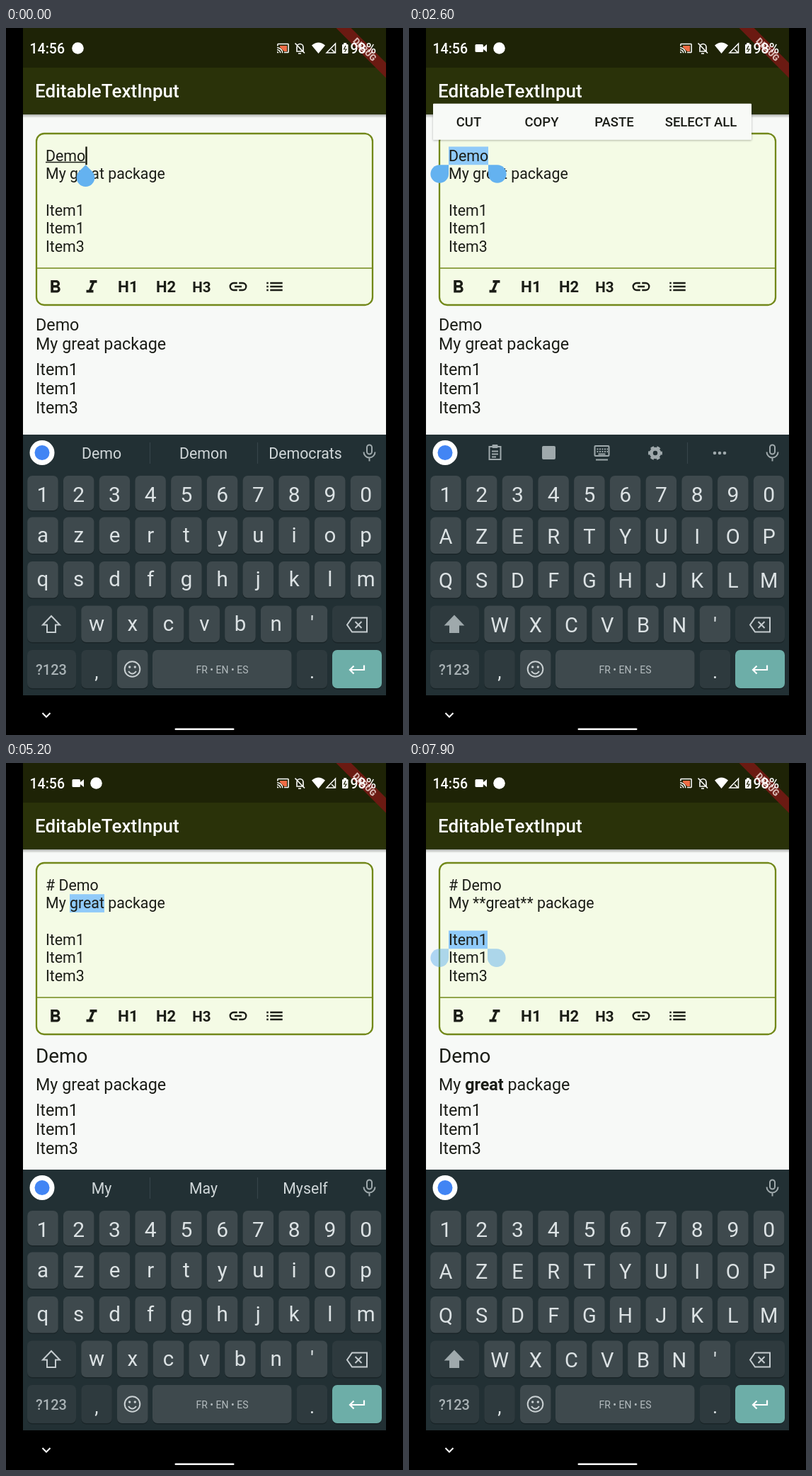
An HTML page for the animation above (8000 ms loop, 561 by 998 pixels).

```html
<!DOCTYPE html>
<html lang="en">
<head>
<meta charset="utf-8">
<title>Text editor demo</title>
<style>
  html, body { margin: 0; width: 100%; height: 100%; overflow: hidden; background: #000; }
  svg { display: block; width: 561px; height: 998px; font-family: Roboto, sans-serif; }
  text { white-space: pre; }
</style>
</head>
<body>
<svg id="stage" viewBox="0 0 561 998">
  <defs>
    <filter id="soft" x="-10%" y="-30%" width="120%" height="160%">
      <feDropShadow dx="0" dy="1" stdDeviation="1.6" flood-opacity=".3"/>
    </filter>
    <linearGradient id="barShade" x2="0" y2="1">
      <stop stop-opacity=".3"/><stop offset="1" stop-opacity="0"/>
    </linearGradient>
    <clipPath id="screen"><path d="M24 0h513v998H24z"/></clipPath>
  </defs>
  <path d="M0 0h561v998H0z"/>
  <path d="M24 122h513v452H24z" fill="#f7f9f7"/>
  <g id="page"></g>
  <path d="M24 122h513v5H24z" fill="url(#barShade)"/>
  <path d="M24 0h513v56H24z" fill="#1e2306"/>
  <path d="M24 56h513v66H24z" fill="#2a3209"/>
  <text x="41" y="97.7" font-size="26" font-weight="500" fill="#fff">EditableTextInput</text>
  <g id="popup"></g>
  <g clip-path="url(#screen)">
    <g transform="translate(537 0) rotate(45)">
      <path d="M-60 34.9H60v15H-60z" fill="#6b1a12"/>
      <text y="47" font-size="12.7" font-weight="900" fill="#d9b9b4" text-anchor="middle">DEBUG</text>
    </g>
  </g>
  <g id="status"></g>
  <path d="M24 574h513v368H24z" fill="#223034"/>
  <g id="keys"></g>
  <g id="strip"></g>
  <path d="M51.500 967l5.500 5.500 5.500-5.500" fill="none" stroke="#fff" stroke-width="2"/>
  <rect x="238.500" y="988.500" width="84" height="2.600" rx="1.300" fill="#fff"/>
</svg>
<script>
const LOOP = 8000, LINE = 25.7, EDIT = 21.35, LEFT = 56;
const INK = '#1b1d17', KEY_INK = '#dce2e4', DIM = '#9fa9ac', BLUE = '#64b2f0';
const $ = id => document.getElementById(id);

const ICONS = {
  bold: 'M15.6 10.79c.97-.67 1.65-1.77 1.65-2.79 0-2.26-1.75-4-4-4H7v14h7.04c2.09 0 3.71-1.7 3.71-3.79 0-1.52-.86-2.82-2.15-3.42zM10 6.500h3c.83 0 1.500.67 1.500 1.500s-.67 1.500-1.500 1.500h-3zm3.500 9H10v-3h3.500c.83 0 1.500.67 1.500 1.500s-.67 1.500-1.500 1.500z',
  italic: 'M10 4v3h2.21l-3.42 8H6v3h8v-3h-2.21l3.42-8H18V4z',
  link: 'M3.9 12c0-1.71 1.39-3.1 3.1-3.1h4V7H7a5 5 0 0 0 0 10h4v-1.9H7c-1.71 0-3.1-1.39-3.1-3.1zM8 13h8v-2H8zm9-6h-4v1.9h4a3.1 3.1 0 0 1 0 6.2h-4V17h4a5 5 0 0 0 0-10z',
  list: 'M3 13h2v-2H3zm0 4h2v-2H3zm0-8h2V7H3zm4 4h14v-2H7zm0 4h14v-2H7zM7 7v2h14V7z',
  cast: 'M1 18v3h3c0-1.66-1.34-3-3-3zm0-4v2c2.76 0 5 2.24 5 5h2c0-3.87-3.13-7-7-7zm0-4v2a9 9 0 0 1 9 9h2c0-6.08-4.93-11-11-11zm20-7H3c-1.1 0-2 .9-2 2v3h2V5h18v14h-7v2h7c1.1 0 2-.9 2-2V5c0-1.1-.9-2-2-2z'
};

const text = (s, x, y, size, fill = INK, extra = '') =>
  `<text x="${x}" y="${y}" font-size="${size}" fill="${fill}" ${extra}>${s}</text>`;
const mid = (s, x, y, size, fill, weight = 400) =>
  text(s, x, y, size, fill, `text-anchor="middle" font-weight="${weight}"`);
const rect = (x, y, w, h, fill, r = 0, extra = '') =>
  `<rect x="${x}" y="${y}" width="${w}" height="${h}" rx="${r}" fill="${fill}" ${extra}/>`;
const line = (d, color, width = 2, fill = 'none') =>
  `<path d="${d}" fill="${fill}" stroke="${color}" stroke-width="${width}"/>`;
const icon = (name, x, y, scale = 1.247, fill = INK) =>
  `<path d="${ICONS[name]}" fill="${fill}" transform="translate(${x} ${y}) scale(${scale}) translate(-12 -12)"/>`;
const grip = (x, y, turn, opacity) =>
  `<path d="M0 0h12.8a12.8 12.8 0 1 1-12.8 12.8z" fill="${BLUE}" opacity="${opacity}" transform="translate(${x} ${y}) ${turn}"/>`;

// Each step overrides part of the state from its time on.
const START = { md: 0, bold: 0, under: 1, cam: 0, caps: 0, words: 'Demo Demon Democrats',
  tools: 0, caret: [113.5, 0], on: 1, drop: 1, sel: null, grips: 0, pop: null, fade: 1 };
const FULL = ['CUT', 'COPY', 'PASTE', 'SELECT ALL'], SHORT = ['PASTE', 'SELECT ALL'];
const STEPS = [
  [0, {}],
  [100, { cam: .25 }],
  [200, { cam: .5, caps: 1, words: '' }],
  [300, { cam: .75 }],
  [400, { cam: 1 }],
  [600, { on: 0 }],
  [1000, { on: 1 }],
  [1500, { on: 0 }],
  [1600, { under: 0, drop: 0, sel: [56, 112, 0] }],
  [1700, { grips: .5, pop: { x: 34, line: 0, items: FULL }, fade: .5 }],
  [1800, { grips: 1, fade: 1 }],
  [2400, { tools: 1 }],
  [2700, { md: 1, caps: 0, tools: 0, sel: null, grips: 0, pop: null, caret: [131, 0], on: 1, drop: 1 }],
  [2900, { words: 'Demo Demon Democrats', pop: { x: 34, line: 0, items: SHORT } }],
  [3500, { on: 0 }],
  [4000, { pop: null, caret: [75.500, 1], on: 1, drop: .85 }],
  [4100, { drop: 1, words: 'My May Myself' }],
  [4600, { on: 0 }],
  [5200, { drop: 0, sel: [90, 139, 1] }],
  [5300, { grips: .5, pop: { x: 34, line: 1, items: FULL }, fade: .5 }],
  [5400, { grips: 1, fade: 1 }],
  [5500, { words: '' }],
  [5900, { tools: 1 }],
  [6100, { bold: 1, sel: null, grips: 0, pop: null, tools: 0, caret: [177, 1], on: 1, drop: 1 }],
  [6400, { words: 'I a you', pop: { x: 54, line: 1, items: SHORT } }],
  [6800, { on: 0 }],
  [7300, { on: 1 }],
  [7800, { on: 0, drop: 0, pop: null, words: '', sel: [56, 111, 3] }],
  [7900, { caps: 1, grips: .5 }]
];
let last = START;
const STATES = STEPS.map(([, change]) => last = { ...last, ...change });

function drawPage(s) {
  const top = n => 167.500 + n * LINE;
  const rows = [s.md ? '# Demo' : 'Demo', s.bold ? 'My **great** package' : 'My great package',
    '', 'Item1', 'Item1', 'Item3'];
  let out = rect(43, 149, 475, 242, '#f4fbe5', 11, 'stroke="#72881a" stroke-width="2.300"') +
    line('M43 339H518', '#72881a', 1.300);
  if (s.sel) out += rect(s.sel[0], top(s.sel[2]), s.sel[1] - s.sel[0], LINE, '#90caf9');
  rows.forEach((row, n) => out += text(row, LEFT, 187.500 + n * LINE, EDIT));
  if (s.under) out += line('M56 189.500H112', INK, 1.300);
  out += icon('bold', 69.500, 366) + icon('italic', 121, 366) + icon('link', 328, 365) + icon('list', 379.500, 365);
  out += mid('H1', 172.500, 372.500, 22.500, INK, 700) + mid('H2', 226, 372.500, 22, INK, 700) +
    mid('H3', 276.500, 372.500, 20.600, INK, 700);
  if (s.on) out += rect(s.caret[0] - 1.200, top(s.caret[1]), 2.400, LINE, '#15180a');
  if (s.drop) out += grip(s.caret[0] - 1, top(s.caret[1] + 1), 'rotate(45)', s.drop);
  if (s.grips) {
    const y = top(s.sel[2] + 1);
    out += grip(s.sel[0], y, 'scale(-1 1)', s.grips) + grip(s.sel[1], y, '', s.grips);
  }
  const great = s.bold ? '<tspan font-weight="700">great</tspan>' : 'great';
  const base = s.md ? 461.500 : 454, items = s.md ? 498 : 490;
  const preview = text('Demo', 42, s.md ? 423 : 427, s.md ? 27.900 : 23.300) +
    text(`My ${great} package`, 42, base, 23.300) +
    ['Item1', 'Item1', 'Item3'].map((t, i) => text(t, 42, items + i * 27, 23.300)).join('');
  $('page').innerHTML = `<g transform="translate(0 ${s.md ? -8 : 0})">${out}</g>${preview}`;
}

function drawPopup(s) {
  let out = '';
  if (s.pop) {
    const { x, line: row, items } = s.pop;
    const y = (s.md ? 98.800 : 106.800) + row * LINE;
    const full = items === FULL;
    const centers = full ? [50.500, 153.500, 256, 378.500] : [51, 173.500];
    out = `<g opacity="${s.fade}">` + rect(x, y, full ? 450 : 244, 51, '#f8faf7', 1, 'filter="url(#soft)"') +
      items.map((t, i) => mid(t, x + centers[i], y + 32, 18.500, INK, 500)).join('') + '</g>';
  }
  $('popup').innerHTML = out;
}

function drawStatus(s) {
  const white = '#fff';
  let out = text('14:56', 33.500, 35.500, 19.500, white, 'font-weight="500"');
  if (s.cam) out += `<g opacity="${s.cam}">` + rect(93.500, 23, 11.500, 11, white, 1.500) +
    '<path d="M105 27l5-4v11l-5-4z" fill="#fff"/></g>';
  out += `<circle cx="${101.500 + 26 * s.cam}" cy="28.500" r="8.300" fill="#fff"/>`;
  out += '<path d="M387 25h10v8h-4l-6-6z" fill="#ef6c45"/>' + icon('cast', 391.500, 28.500, .76, white);
  out += line('M410 33h11M411 32v-5a4.500 4.500 0 0 1 9 0v5M413 36h4M408.500 21.500l13.500 14', white, 1.600);
  out += '<path d="M432 24.500Q441.500 16.500 451 24.500L441.500 36z" fill="#fff"/>';
  out += line('M465.500 22v13H453zM460 30l5 5', white, 1.500) + rect(475, 23, 8.500, 13, white, 1.200) +
    rect(477.200, 21, 4, 3, white) + line('M480 25l-2.500 5h3.500l-2.500 4', '#1e2306', 1.200);
  out += text('98%', 486.500, 35.500, 19.500, white, 'font-weight="500"');
  $('status').innerHTML = out;
}

function drawKeys(s) {
  const PITCH = 50.73, FACE = '#3e494d', DARK = '#2e3a3e';
  const key = (x, y, w, h, fill = FACE) => rect(x, y + 1.500, w, h, '#1a2528', 7) + rect(x, y, w, h, fill, 7);
  const row = (chars, x, y, h, base, size) => [...chars].map((c, i) =>
    key(x + i * PITCH, y, 43.500, h) + mid(c, x + 21.800 + i * PITCH, base, size, KEY_INK)).join('');
  const fit = c => s.caps ? c.toUpperCase() : c;
  const drop = s.caps ? 38 : 36, size = s.caps ? 29 : 29.500;
  let out = row('1234567890', 30.200, 632, 49, 668.500, 30);
  out += row(fit('azertyuiop'), 30.200, 690.500, 51.500, 690 + drop, size);
  out += row(fit('qsdfghjklm'), 30.200, 753, 51.500, 752 + drop, size);
  out += row(fit("wxcvbn'"), 106.300, 815.500, 51.500, 815 + drop, size);
  out += key(30, 815.500, 69, 51.500, DARK) + key(461, 815.500, 70, 51.500, DARK);
  out += line('M64 830L76 842.500H70V853H58V842.500H52z', s.caps ? DIM : '#c5cccf', 2, s.caps ? DIM : 'none');
  out += line('M489 832.500H510V852.500H489L482 842.500zM493.500 838l9 9m0-9l-9 9', '#c5cccf', 2);
  out += key(30, 878, 69, 54, DARK) + key(106.300, 878, 43.500, 54, DARK) + key(157, 878, 43.500, 54) +
    key(207, 878, 196.500, 54) + key(410.600, 878, 43.500, 54, DARK) + key(461, 878, 70, 54, '#6daea8');
  out += mid('?123', 64, 912.500, 20, '#a9b2b5', 500) + mid(',', 128, 918, 27, KEY_INK) +
    mid('.', 432.500, 918, 27, KEY_INK) + mid('FR • EN • ES', 305.500, 910.500, 14, '#b4bcbf');
  out += '<circle cx="178.500" cy="905" r="10.800" fill="none" stroke="#c9d0d2" stroke-width="2"/>' +
    '<circle cx="174.700" cy="902" r="1.700" fill="#c9d0d2"/><circle cx="182.300" cy="902" r="1.700" fill="#c9d0d2"/>' +
    line('M173 908q5.500 7 11 0', '#c9d0d2', 2);
  out += line('M506 899.500v6.500H486m5.500-5.500l-5.500 5.500 5.500 5.500', '#fff', 2.200);
  $('keys').innerHTML = out;
}

function drawStrip(s) {
  const rule = x => line(`M${x} 585V615`, '#36444a', 1.200);
  let out = '<circle cx="51" cy="599.500" r="17.500" fill="#fff"/><circle cx="51" cy="599.500" r="10.500" fill="#4285f4"/>';
  out += rect(510, 588.500, 7, 13, 'none', 3.500, `stroke="${DIM}" stroke-width="2"`) +
    line('M505.500 598.500a8 8 0 0 0 16 0M513.500 606.500v5', DIM, 2);
  if (s.words) {
    out += rule(203.500) + rule(355.500) +
      s.words.split(' ').map((w, i) => mid(w, 135 + i * 144, 608, 21.300, '#d0d7d9')).join('');
  }
  if (s.tools) {
    out += line('M113.500 591h16v18h-16zM117 597.500h9M117 601.500h9M117 605.500h6', DIM) + rect(117.500, 588, 8, 5, DIM, 1);
    out += rect(188, 590, 19, 19, DIM, 2);
    out += rect(262.500, 590, 20, 14, 'none', 1, `stroke="${DIM}" stroke-width="2"`) +
      `<path d="M265.500 594.500H281M265.500 598H281" stroke="${DIM}" stroke-width="2" stroke-dasharray="2 1.500"/>` +
      line('M267.500 601.500h10M264 609.500h17', DIM);
    out += `<circle cx="348" cy="600" r="5.700" fill="none" stroke="${DIM}" stroke-width="5"/>` +
      `<circle cx="348" cy="600" r="8.500" fill="none" stroke="${DIM}" stroke-width="3" stroke-dasharray="4.900 4" stroke-dashoffset="2.450"/>`;
    out += rule(393.500) + [432, 439, 446].map(x => `<circle cx="${x}" cy="600" r="2.300" fill="${DIM}"/>`).join('');
  }
  $('strip').innerHTML = out;
}

let shown = -1;
function tick() {
  const now = performance.now() % LOOP;
  const index = STEPS.findLastIndex(([time]) => time <= now);
  if (index !== shown) {
    shown = index;
    for (const draw of [drawPage, drawPopup, drawStatus, drawKeys, drawStrip]) draw(STATES[index]);
  }
  requestAnimationFrame(tick);
}
tick();
</script>
</body>
</html>
```
